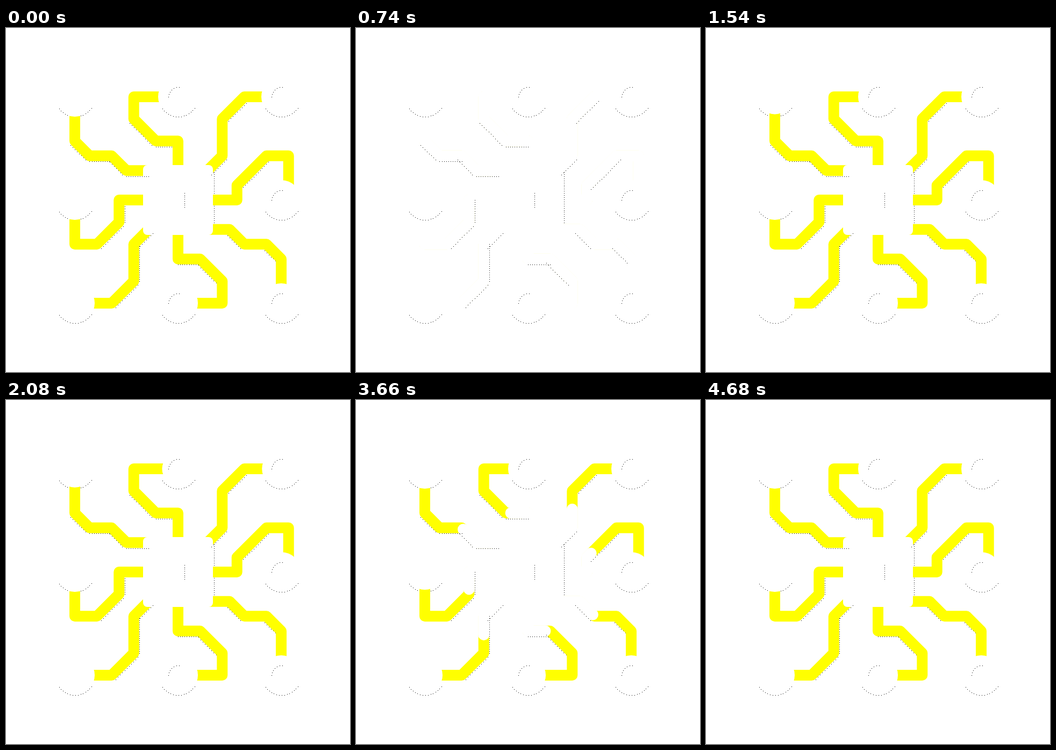
An HTML page with a canvas that plays this animation: 640 by 640 pixels, repeating every 4700 ms.

```html
<!DOCTYPE html>
<html>
<head>
<meta charset="utf-8">
<style>
  html, body { margin: 0; width: 100%; height: 100%; overflow: hidden; background: #fff; }
  canvas { display: block; }
</style>
</head>
<body>
<canvas width="640" height="640"></canvas>
<script>
const ctx = document.querySelector('canvas').getContext('2d');
const LOOP = 4700, SWEEP = 500, PULSE = 780;
const WIDTH = 20, NODE_RADIUS = 37, RING_RADIUS = 18;
const ORIGIN = 128, CELL = 384 / 14; // the board is a 14 by 14 grid

// Routes from node to chip, as compass steps in grid cells.
const corner = 's3 se1 e1.5 se1 e1.5';
const hook = 'w3 s1.5 se1.5 e1.5 s2';
const bend = 'w2.5 sw1.5 s2.5 sw1';
const right = 'e.5 n3 w1.5 sw2 s1 w2';
const left = 's3 e1.5 ne1.5 n1.5 e2';

// Clockwise; a turn of -1 rotates the route by half a circle.
const traces = [
  makeTrace(0, 0, corner), makeTrace(7, 0, hook), makeTrace(14, 0, bend),
  makeTrace(14, 7, right), makeTrace(14, 14, corner, -1), makeTrace(7, 14, hook, -1),
  makeTrace(0, 14, bend, -1), makeTrace(0, 7, left)
];

function makeTrace(col, row, route, turn = 1) {
  let x = ORIGIN + col * CELL, y = ORIGIN + row * CELL, length = 0;
  const points = [[x, y]];
  for (const step of route.split(' ')) {
    const [, heading, cells] = step.match(/([a-z]+)(.+)/);
    const axis = (plus, minus) =>
      (heading.includes(plus) - heading.includes(minus)) * cells * CELL * turn;
    const dx = axis('e', 'w'), dy = axis('s', 'n');
    points.push([x += dx, y += dy]);
    length += Math.hypot(dx, dy);
  }
  return { points, length };
}

const clamp = x => Math.max(0, Math.min(1, x));
const ramp = (t, from) => clamp((t - from) / SWEEP);

function strokeTrace({ points, length }, from, to, width, cap) {
  ctx.beginPath();
  points.forEach(p => ctx.lineTo(...p));
  ctx.lineWidth = width;
  ctx.lineCap = cap;
  ctx.lineJoin = 'round';
  ctx.setLineDash([Math.max(.01, (to - from) * length), 2 * length]);
  ctx.lineDashOffset = -from * length;
  ctx.stroke();
}

const dot = (x, y) => ctx.fillRect(Math.round(x), Math.round(y), 1, 1);

function dotLine(x1, y1, x2, y2) {
  const n = Math.round(Math.max(Math.abs(x2 - x1), Math.abs(y2 - y1)) / 4);
  for (let i = 0; i <= n; i++) dot(x1 + (x2 - x1) * i / n, y1 + (y2 - y1) * i / n);
}

function dotArc(x, y, r, from, to) {
  for (let a = from; a <= to; a += 5 / r) dot(x + r * Math.cos(a), y + r * Math.sin(a));
}

// Dots follow the lower edge of diagonals, and of straight runs after them on the left.
function dotEdges({ points }) {
  let afterDiagonal = false;
  for (let i = 1; i < points.length; i++) {
    const [x1, y1] = points[i - 1], [x2, y2] = points[i];
    const dx = x2 - x1, dy = y2 - y1;
    const diagonal = Math.abs(dx * dy) > 1;
    if (diagonal || afterDiagonal && x1 < 370) {
      const side = (dx || dy) < 0 ? -1 : 1;
      const k = (WIDTH / 2 + .7) * side / Math.hypot(dx, dy);
      const nx = dx ? -dy * k : Math.abs(dy * k), ny = dx * k;
      dotLine(x1 + nx, y1 + ny, x2 + nx, y2 + ny);
    }
    afterDiagonal = diagonal;
  }
}

function drawDots() {
  for (const trace of traces) {
    const [x, y] = trace.points[0];
    dotEdges(trace);
    dotArc(x, y, NODE_RADIUS, .6, 2.6);
    if (x > ORIGIN) dotArc(x, y, RING_RADIUS, Math.PI, 5);
  }
  dotLine(387, 268, 387, 362);
  dotLine(332, 307, 332, 333);
}

// Erased range of every trace: an inward sweep, later an outward one.
function sweep(t) {
  if (t < 1190) return [ramp(t, 690), ramp(t, 0)];
  if (t < 3020) return null;
  return [.985 * (1 - ramp(t, 3510)), 1 - ramp(t, 4200)];
}

function draw(t) {
  ctx.globalCompositeOperation = 'source-over';
  ctx.clearRect(0, 0, 640, 640);
  ctx.strokeStyle = '#ff0';
  ctx.fillStyle = '#000';
  for (const trace of traces) strokeTrace(trace, 0, 1, WIDTH, 'butt');

  ctx.globalCompositeOperation = 'destination-out';
  const range = sweep(t);
  traces.forEach((trace, i) => {
    if (range) strokeTrace(trace, ...range, WIDTH + 1, 'round');
    const start = Math.min(3020, 1380 + 330 * i);
    const dip = .2 * Math.sin(Math.PI * clamp((t - start) / PULSE));
    ctx.beginPath();
    ctx.arc(...trace.points[0], NODE_RADIUS * (1 - dip), 0, 2 * Math.PI);
    ctx.fill();
  });
  ctx.beginPath();
  ctx.roundRect(255, 255, 130, 130, 8);
  ctx.fill();

  ctx.globalCompositeOperation = 'destination-over';
  drawDots();
}

function tick() {
  draw(performance.now() % LOOP);
  requestAnimationFrame(tick);
}
tick();
</script>
</body>
</html>
```
